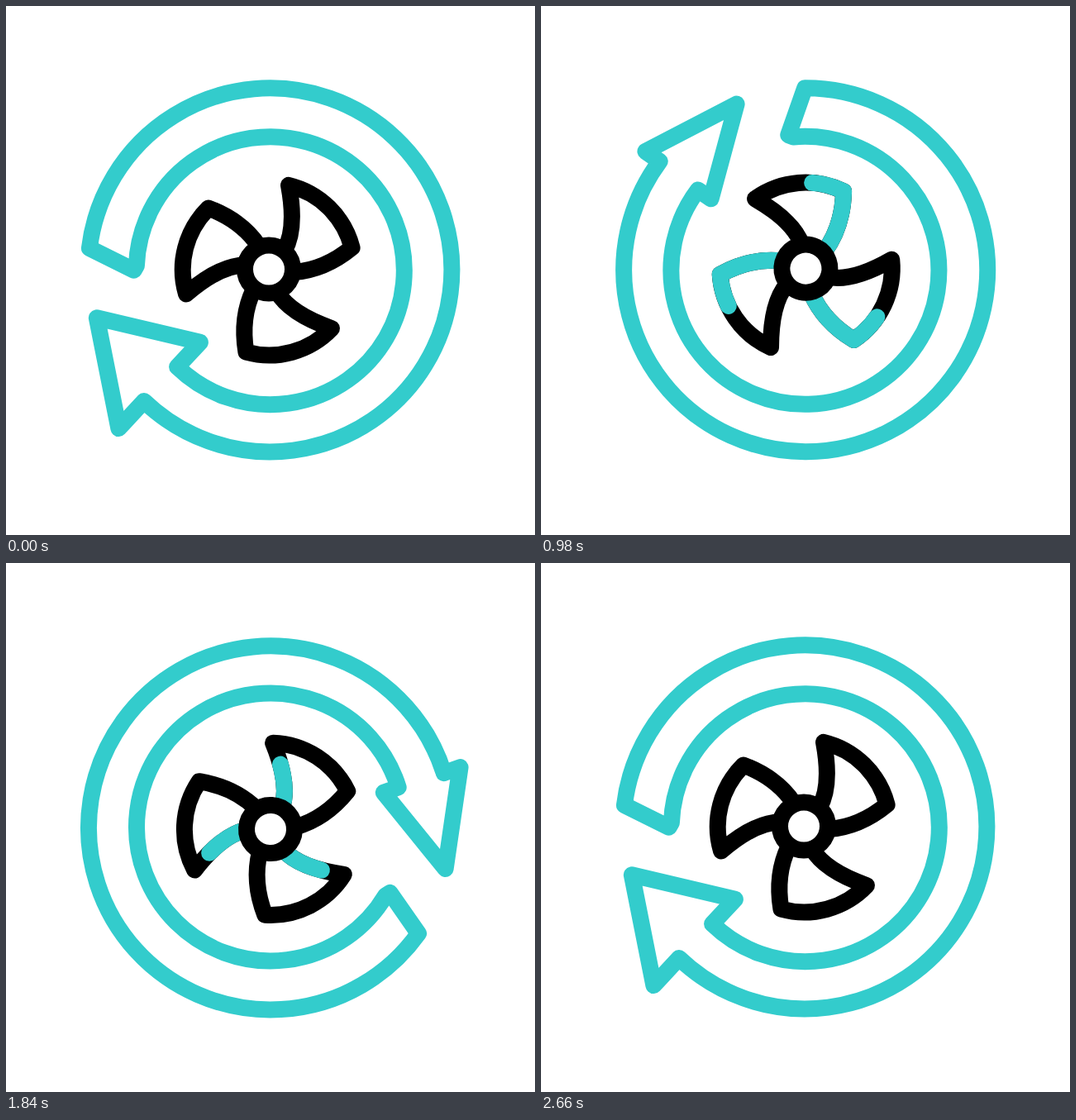
An HTML page for the animation above (3.3 s loop, 640 px wide and 640 px high).

```html
<!DOCTYPE html>
<html lang="en">
<head>
<meta charset="utf-8">
<title>Fan rotation</title>
<style>
  html, body { margin: 0; height: 100%; overflow: hidden; background: #fff; }
  svg { display: block; width: 100vw; height: 100vh; }
  path, circle { fill: none; stroke-width: 20; stroke-linecap: round; stroke-linejoin: round; }
  .teal { stroke: #3cc; }
  .black { stroke: #000; }
</style>
</head>
<body>
<svg viewBox="0 0 640 640">
  <defs>
    <path id="blade" pathLength="100" d="M-12-28Q-33-59-73-74A104.5 104.5 0 0 0-100 30Q-59-5-29-5"/>
    <g id="blades">
      <use href="#blade"/>
      <use href="#blade" transform="rotate(120)"/>
      <use href="#blade" transform="rotate(240)"/>
    </g>
  </defs>
  <g transform="translate(319.8 319.8)">
    <path id="arrow" class="teal"/>
    <g id="dashes" class="teal"></g>
    <g id="fan">
      <g transform="translate(-1.8 -1.3)">
        <use href="#blades" class="black"/>
        <use href="#blades" id="tint" class="teal"/>
        <circle r="29" class="black"/>
      </g>
    </g>
  </g>
</svg>
<script>
const LOOP = 3300;
const $ = id => document.getElementById(id);
const mix = (a, b, k) => a + (b - a) * k;
const progress = (t, from, to) => Math.min(1, Math.max(0, (t - from) / (to - from)));
const smooth = u => u * u * (3 - 2 * u);
const ramp = (t, from, to) => smooth(progress(t, from, to));

// Point in polar form, angle in degrees clockwise from the right
const polar = (r, deg) => {
  const a = deg * Math.PI / 180;
  return (r * Math.cos(a)).toFixed(2) + ' ' + (r * Math.sin(a)).toFixed(2);
};

// Cubic easing with control points (x1, 0) and (x2, 1)
function ease(u, x1, x2) {
  let lo = 0, hi = 1;
  for (let i = 0; i < 24; i++) {
    const s = (lo + hi) / 2, r = 1 - s;
    if (3 * r * r * s * x1 + 3 * r * s * s * x2 + s ** 3 < u) lo = s; else hi = s;
  }
  return smooth(lo);
}

// Time, angle, speed in degrees per ms
const fanKeys = [
  [260, 0, 0], [720, 242.4, .72], [1240, 613.6, .69], [1560, 816.4, .555],
  [1840, 948, .37], [2260, 1055, .13], [2660, 1080, 0]
];

function fanAngle(t) {
  if (t <= 260 || t >= 2660) return 0;
  const i = fanKeys.findIndex(key => key[0] > t);
  const [t0, a0, v0] = fanKeys[i - 1], [t1, a1, v1] = fanKeys[i];
  const h = t1 - t0, u = (t - t0) / h;
  return mix(a0, a1, smooth(u)) + h * u * (1 - u) * (v0 * (1 - u) - v1 * u);
}

function arrowPath(shrink) {
  const base = 134;
  return `M${polar(220.5, 187)}A220 220 0 1 1 ${polar(220, base)}` +
    `L${polar(mix(265, 241, shrink), 133.8)}L${polar(217.7, 164.7)}` +
    `L${polar(mix(121.6, 143.3, shrink), 134.3)}L${polar(162.3, base)}` +
    `A162 162 0 1 0 ${polar(162, 182)}L${polar(165, 180)}Z`;
}

// Radial strokes thrown off the ring: angle, inner and outer radius, start time
const dashes = [[-95.7, 254, 303.5, 1015], [-50.2, 256, 338, 1150], [81.6, 256, 282.5, 1322]]
  .map(([angle, inner, outer, start]) => {
    const path = document.createElementNS('http://www.w3.org/2000/svg', 'path');
    $('dashes').append(path);
    return { path, angle, inner, outer, start };
  });

function drawDash({ path, angle, inner, outer, start }, t) {
  const half = 150;
  const tail = mix(inner, outer, ramp(t, start + half, start + 2 * half));
  const head = mix(inner, outer, ramp(t, start, start + half));
  path.setAttribute('d', head > tail ? `M${polar(tail, angle)}L${polar(head, angle)}` : '');
}

function draw(t) {
  const turn = 720 * ease(progress(t, 474, 2585), .455, .486);
  $('arrow').setAttribute('d', arrowPath(ramp(t, 260, 480) - ramp(t, 2420, 2660)));
  $('arrow').setAttribute('transform', `rotate(${turn})`);
  $('fan').setAttribute('transform', `rotate(${fanAngle(t)})`);

  const from = 100 * ramp(t, 1164, 2110), to = 100 * ramp(t, 690, 1330);
  const tint = $('tint').style;
  tint.visibility = to > from ? 'visible' : 'hidden';
  tint.strokeDasharray = `${to - from} 300`;
  tint.strokeDashoffset = -from;

  dashes.forEach(dash => drawDash(dash, t));
}

function tick() {
  draw(performance.now() % LOOP);
  requestAnimationFrame(tick);
}
tick();
</script>
</body>
</html>
```
